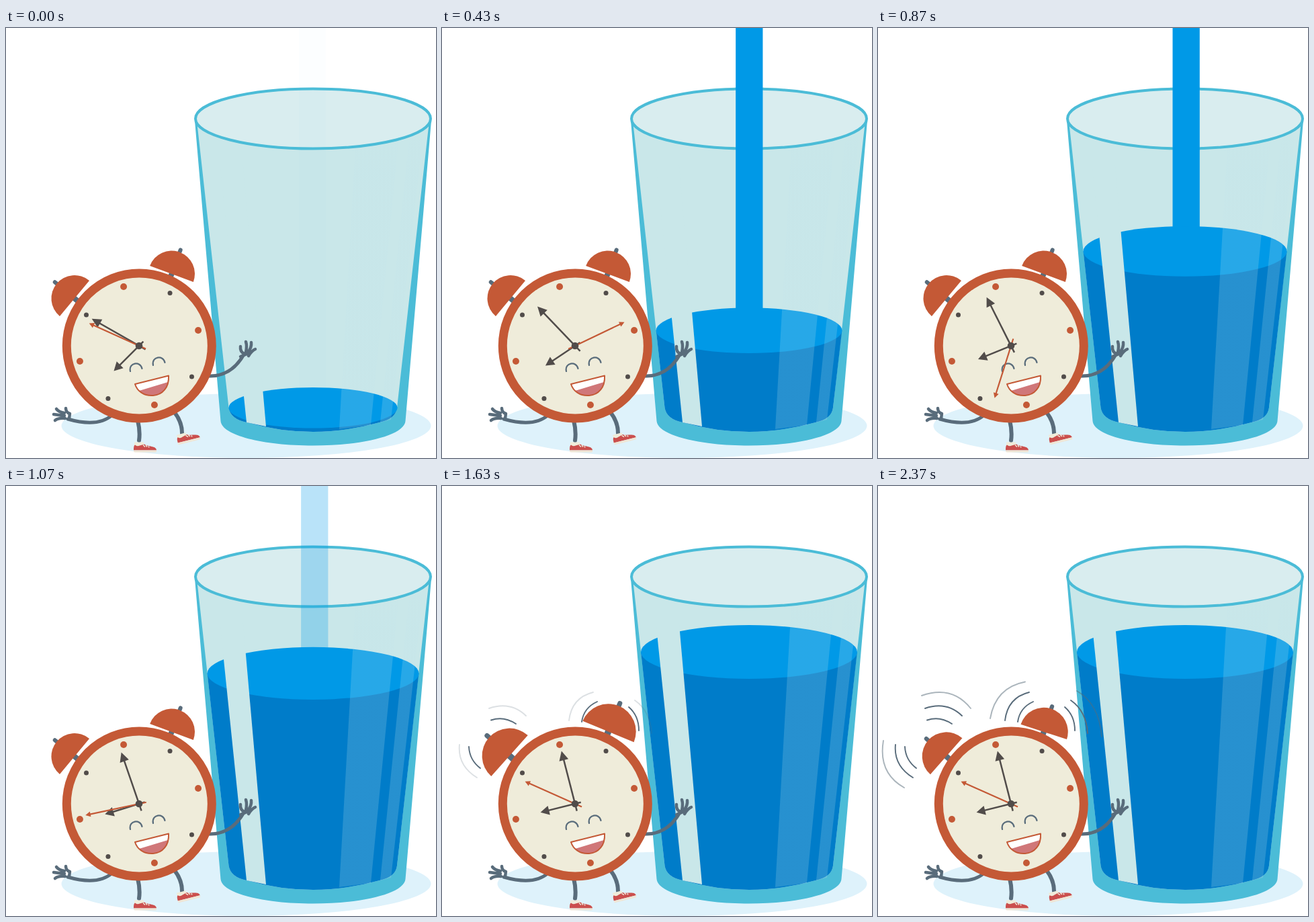
An HTML page for the animation above (2.41 s loop, 640 by 640 pixels).

```html
<!DOCTYPE html>
<html lang="en">
<head>
<meta charset="utf-8">
<title>Clock and glass</title>
<style>
  html, body { margin: 0; width: 100%; height: 100%; overflow: hidden; background: #fff; }
  svg { display: block; width: 100vw; height: 100vh; }
  .limb { fill: none; stroke: #596c7b; stroke-linecap: round; stroke-linejoin: round; }
</style>
</head>
<body>
<svg viewBox="0 0 640 640" xmlns="http://www.w3.org/2000/svg">
  <defs>
    <linearGradient id="shine" gradientUnits="userSpaceOnUse" x1="0" y1="140" x2="0" y2="215">
      <stop offset="0" stop-color="#c3e4eb" stop-opacity="0"/>
      <stop offset="1" stop-color="#c3e4eb" stop-opacity=".2"/>
    </linearGradient>
    <g id="shoe">
      <path d="M1-15H15L16-9H1Z" fill="#efecda"/>
      <path d="M0-3C0-7 0-10 2-11Q5-8 9-10L16-12C21-8 34-10 34-3Z" fill="#cb4f4d"/>
      <path d="M14-11L17-8M18-11L20-8M22-9L23-7" stroke="#efecda" stroke-width="1.5"/>
      <path d="M0-3H34V-1Q34 0 32 0H2Q0 0 0-2Z" fill="#efe6d6"/>
    </g>
    <g id="bell">
      <path class="limb" d="M0-33V-38" stroke-width="6"/>
      <path d="M-4-1H4V12H-4Z" fill="#596c7b"/>
      <path d="M-34.5 0A34.5 34.5 0 0 1 34.5 0Z" fill="#c45936"/>
    </g>
  </defs>

  <ellipse cx="357.500" cy="592" rx="275" ry="48" fill="#def2fb"/>

  <g id="glass">
    <path d="M281 138L319.500 585C321 606 382 621.500 457 621.500S593 606 594.500 585L633 138Z" fill="#4bbcd7"/>
    <path d="M284 138L331.500 565Q334 582 358 587Q457 615 556 587Q580 582 582 565L630 138Z" fill="#c9e7e9"/>
    <path id="water" fill="#007cc9"/>
    <ellipse id="surface" cx="457" fill="#0099e7"/>
    <path d="M318 200H352.500L387 593L358 587Z" fill="#c9e7e9"/>
    <path d="M522 140H587L543 591L496 597Z" fill="url(#shine)"/>
    <path d="M602.500 140H623L573 583L557 587Z" fill="url(#shine)"/>
    <ellipse cx="457" cy="135" rx="175" ry="44.500" fill="#d9edef" stroke="#4bbcd7" stroke-width="4"/>
    <rect id="stream" y="0" width="40.300" fill="#0099e7"/>
  </g>

  <g class="limb">
    <path d="M302 518Q335 519 354 486" stroke-width="5"/>
    <path d="M349 474Q348 482 355 485M357 467Q359 473 357 483M365 468Q366 475 360 483M371 478Q366 480 361 488M349 489L359 485" stroke-width="4.500"/>
    <path d="M158 576Q137 595 92 582" stroke-width="5"/>
    <path d="M89 566Q89 572 95 574L94 581M75 567Q79 572 87 573M71 575Q78 576 87 577M73 584Q78 580 88 581" stroke-width="4.500"/>
    <path d="M196 584Q200 600 198 614M250 571Q262 586 262 603" stroke-width="6"/>
  </g>
  <use href="#shoe" transform="translate(190 631.500)"/>
  <use href="#shoe" transform="translate(256.500 620.500) rotate(-14)"/>

  <use href="#bell" id="bellL"/>
  <use href="#bell" id="bellR"/>

  <circle cx="198.300" cy="473" r="108" fill="#efecda" stroke="#c45936" stroke-width="13"/>
  <g id="dots" transform="translate(198 473)"></g>

  <g class="limb" stroke-width="2.200">
    <path d="M185 511C182 498 200 495 202.500 507"/>
    <path d="M219 502C216 489 234 486 236.500 498"/>
  </g>
  <path d="M192 530L242 517.500C243 535 233 546 219 547S195 540 192 530Z" fill="#fff"/>
  <path d="M198 540L241 527C238 540 230 546 219 547Q206 548 198 540Z" fill="#d07779"/>
  <path d="M192 530L242 517.500C243 535 233 546 219 547S195 540 192 530Z" fill="none" stroke="#c45936" stroke-width="2" stroke-linejoin="round"/>

  <g transform="translate(198 473)">
    <g id="hour" fill="#514c4a" stroke="#514c4a"><path d="M0 9V-44" stroke-width="2.500"/><path d="M0-53L7-40H-7Z" stroke="none"/></g>
    <g id="minute" fill="#514c4a" stroke="#514c4a"><path d="M0 11V-70" stroke-width="2.500"/><path d="M0-81L7-67H-7Z" stroke="none"/></g>
    <g id="second" fill="#c45936" stroke="#c45936"><path d="M0 11V-76" stroke-width="2.200"/><path d="M0-81.500L4-74H-4Z" stroke="none"/></g>
    <circle r="5.300" fill="#514c4a"/>
  </g>

  <g class="limb" stroke-width="1.900">
    <path class="wave" d="M73 348.500Q92 342 110 354M40 388Q41 408 57 420M208 351Q211 330 231 321M278 329Q293 342 293 364"/>
    <path class="wave" d="M70 331Q102 320 125 342M26 385Q23 416 52 434M189 349Q193 315 225 307M287 319Q310 335 312 368"/>
    <path class="wave" d="M65 312Q110 296 138 331M8 379Q0 427 39 449M167 346Q175 300 219 291.500M296 305Q329 324 333 373"/>
  </g>
</svg>
<script>
const LOOP = 2410, FILL = 1190;
const $ = id => document.getElementById(id);
const set = (el, attrs) => { for (const k in attrs) el.setAttribute(k, attrs[k]); };
const ramp = (t, a, b) => Math.min(1, Math.max(0, (t - a) / (b - a)));
const mix = (a, b, k) => a + (b - a) * k;
const sin = deg => Math.sin(deg * Math.PI / 180);
const waves = document.querySelectorAll('.wave');

for (let i = 0; i < 8; i++) {
  const a = -14.6 + 45 * i, dot = document.createElementNS('http://www.w3.org/2000/svg', 'circle');
  set(dot, { cx: 91 * sin(a), cy: -91 * sin(a + 90), r: i % 2 ? 3.5 : 5, fill: i % 2 ? '#514c4a' : '#c45936' });
  $('dots').append(dot);
}

function turn(id, deg) {
  set($(id), { transform: `rotate(${deg})` });
}

function placeBell(id, x, y, deg, scale) {
  set($(id), { transform: `translate(${x} ${y}) rotate(${deg}) scale(${scale})` });
}

function draw(t) {
  const k = ramp(t, 0, FILL);
  turn('hour', mix(225, 256, k));
  turn('minute', mix(-60.3, -14.4, k));
  turn('second', mix(-66, 294, k));

  const y = mix(565.5, 247, k), rx = mix(125.5, 161, k), ry = mix(30.3, 40, k);
  set($('surface'), { cy: y, rx, ry });
  set($('water'), {
    d: `M${457 - rx} ${y}L331.500 565Q334 582 358 587Q457 615 556 587Q580 582 582 565L${457 + rx} ${y}Z`
  });
  set($('stream'), {
    x: 435.8 + t * 0.0031,
    height: y - ry + 1,
    opacity: ramp(t, 0, 100) * (1 - ramp(t, 1000, 1098))
  });

  // Bells swell, wobble, then settle
  const ring = ramp(t, 1190, 1400) * (1 - ramp(t, 2290, 2395));
  const swing = 5 * Math.sqrt(ring), s = t - 1630;
  placeBell('bellL', 102 - 1.5 * ring, 402.5 - ring, -50.3 + swing * sin(22 + 2.586 * s), 1 + 0.185 * ring);
  placeBell('bellR', 246.5 + ring, 366 - 0.5 * ring, 20.3 + swing * sin(22 + 1.768 * s), 1 + 0.195 * ring);

  const fades = [
    ramp(t, 1300, 1500),
    ramp(t, 1570, 1860),
    0.35 * ramp(t, 1950, 2070) + 0.15 * ramp(t, 2070, 2370)
  ];
  waves.forEach((w, i) => set(w, { opacity: fades[i] }));
}

function tick() {
  draw(performance.now() % LOOP);
  requestAnimationFrame(tick);
}
tick();
</script>
</body>
</html>
```
